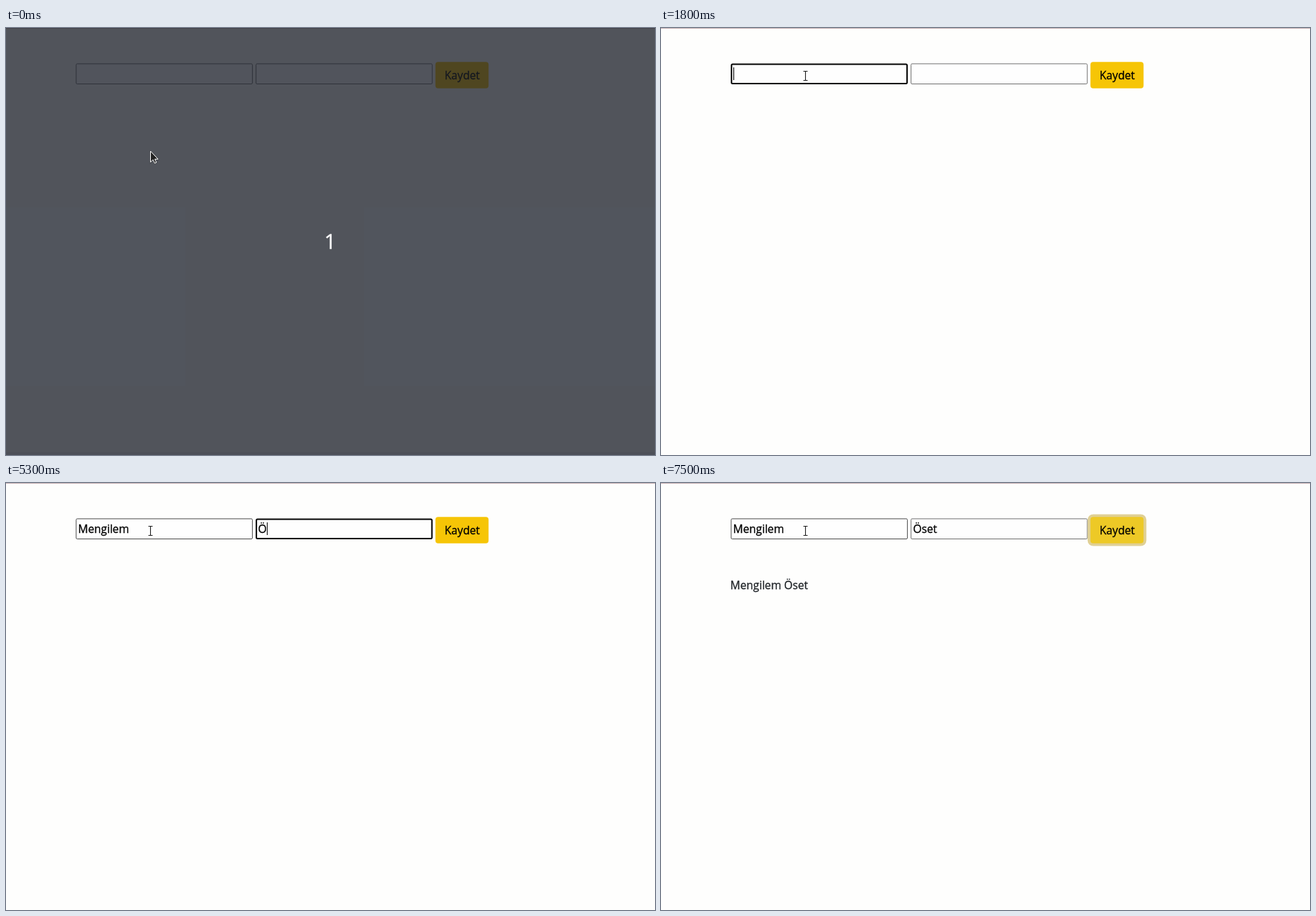
An HTML page that plays this animation: 923 px wide and 607 px high, repeating every 8000 ms.

```html
<!DOCTYPE html>
<html lang="tr">
<head>
<meta charset="utf-8">
<title>Kaydet</title>
<style>
  html, body { margin: 0; width: 100%; height: 100%; overflow: hidden; background: #fefefd; }
  svg { display: block; width: 923px; height: 607px; }
  text {
    font: 15.7px "Open Sans", "Noto Sans", sans-serif; white-space: pre;
    color: #000; fill: currentColor; stroke: currentColor; stroke-width: .3px;
  }
  #result { color: #212529; }
  #count { color: #fff; font-size: 30px; }
</style>
</head>
<body>
<svg viewBox="0 0 923 607">
  <rect width="923" height="607" fill="#fefefd"/>
  <rect width="923" height="1" fill="#c6b0b3"/>

  <rect id="box0" fill="#fefefe"/>
  <rect id="box1" fill="#fefefe"/>
  <text id="text0" x="102.5" y="71"></text>
  <text id="text1" x="358.5" y="71"></text>
  <rect id="caret" y="56" width="1" height="18"/>

  <rect id="ring" fill="#e0d094"/>
  <rect id="button" x="610.7" y="48.2" width="75.6" height="37.6" rx="4"/>
  <text x="648.8" y="73" text-anchor="middle">Kaydet</text>
  <text id="result" x="98.5" y="151"></text>

  <g id="overlay">
    <rect width="923" height="607" fill="#1b1f2a" fill-opacity=".76"/>
    <rect y="603" width="923" height="4" fill="#4d5059"/>
    <text id="count" x="461" y="314" text-anchor="middle">1</text>
  </g>

  <g id="arrow">
    <path d="M.5 1.5V17L4.2 13.6 6.6 18.4 9 17.3 6.8 12.6H11.3Z" fill="none" stroke="#000" stroke-opacity=".12" stroke-width="2"/>
    <path d="M.5.5V16.2L4.2 12.8 6.5 17.8 8.9 16.7 6.7 11.9H11.2Z" fill="#222" stroke="#fff"/>
  </g>
  <g id="beam" fill="none" transform="translate(205.5 68)">
    <path d="M-3-6.5H3M0-6.5V6.5M-3 6.5H3" stroke="#fff" stroke-width="3"/>
    <path d="M-3-6.5H3M0-6.5V6.5M-3 6.5H3" stroke="#1a1a1a" stroke-width="1.1"/>
  </g>
</svg>
<script>
const LOOP = 8000, STEP = 100, BLINK = 500;
const HOVER = 1500, TEXT_CURSOR = 1600, SAVED = 7400;

// keys: the moment each letter is typed
const fields = [
  { name: "Mengilem", from: 1800, to: 4800,
    keys: [2600, 3000, 3200, 3300, 3700, 3700, 3800, 4500] },
  { name: "Öset", from: 4800, to: 6300, keys: [5300, 5700, 5900, 6100] }
];

const el = id => document.getElementById(id);
const show = (id, on) => set(id, { visibility: on ? "visible" : "hidden" });
const glide = (t, a, b) => Math.min(1, Math.max(0, (t - a) / (b - a)));
const mix = (a, b, k) => `rgb(${a.map((v, i) => Math.round(v + (b[i] - v) * k))})`;

function set(id, attrs) {
  for (const k in attrs) el(id).setAttribute(k, attrs[k]);
}

function drawBox(i, focused, hover) {
  const w = focused ? 2 : 1;
  set("box" + i, {
    x: 99.3 + 255.8 * i + w / 2, y: 50.4 + w / 2,
    width: 251.6 - w, height: 29.6 - w, rx: 1.5,
    "stroke-width": w,
    stroke: focused ? "#000" : hover ? "#4a4a4a" : "#707070"
  });
}

// the caret restarts its blinking at every key
function drawCaret(i, typed, t) {
  const { from, keys } = fields[i], text = el("text" + i);
  const last = typed ? keys[typed - 1] : from;
  const len = typed ? text.getComputedTextLength() : 0;
  set("caret", { x: Math.round(+text.getAttribute("x") + len) });
  show("caret", Math.floor((t - last) / BLINK) % 2 === 0);
}

function drawField({ name, from, to, keys }, i, t) {
  const typed = keys.filter(k => k <= t).length;
  const focused = t >= from && t < to;
  el("text" + i).textContent = name.slice(0, typed);
  drawBox(i, focused, i === 0 && t >= HOVER);
  if (focused) drawCaret(i, typed, t);
}

function drawButton(t) {
  const k = glide(t, 6200, 6500), r = 4 * k;
  set("button", { fill: mix([246, 197, 6], [237, 201, 38], k) });
  set("ring", {
    x: 610.7 - r, y: 48.5 - r, width: 75.6 + 2 * r, height: 37 + 2 * r,
    rx: 4 + r, opacity: k
  });
}

function drawPointer(t) {
  const x = 205 - glide(t, 700, 900);
  const y = 174.5 - 51 * glide(t, 500, 900) - 18 * glide(t, 1000, 1100)
    - 37 * glide(t, 1300, 1600);
  set("arrow", { transform: `translate(${x} ${y})` });
  show("arrow", t < TEXT_CURSOR);
  show("beam", t >= TEXT_CURSOR);
}

function render(time) {
  const t = Math.floor(time / STEP) * STEP;
  show("caret", false);
  fields.forEach((f, i) => drawField(f, i, t));
  drawButton(t);
  drawPointer(t);
  el("result").textContent = t >= SAVED ? fields.map(f => f.name).join(" ") : "";
  show("overlay", t < STEP);
}

let start;
function tick(now) {
  start ??= now;
  render((now - start) % LOOP);
  requestAnimationFrame(tick);
}
render(0);
requestAnimationFrame(tick);
</script>
</body>
</html>
```
